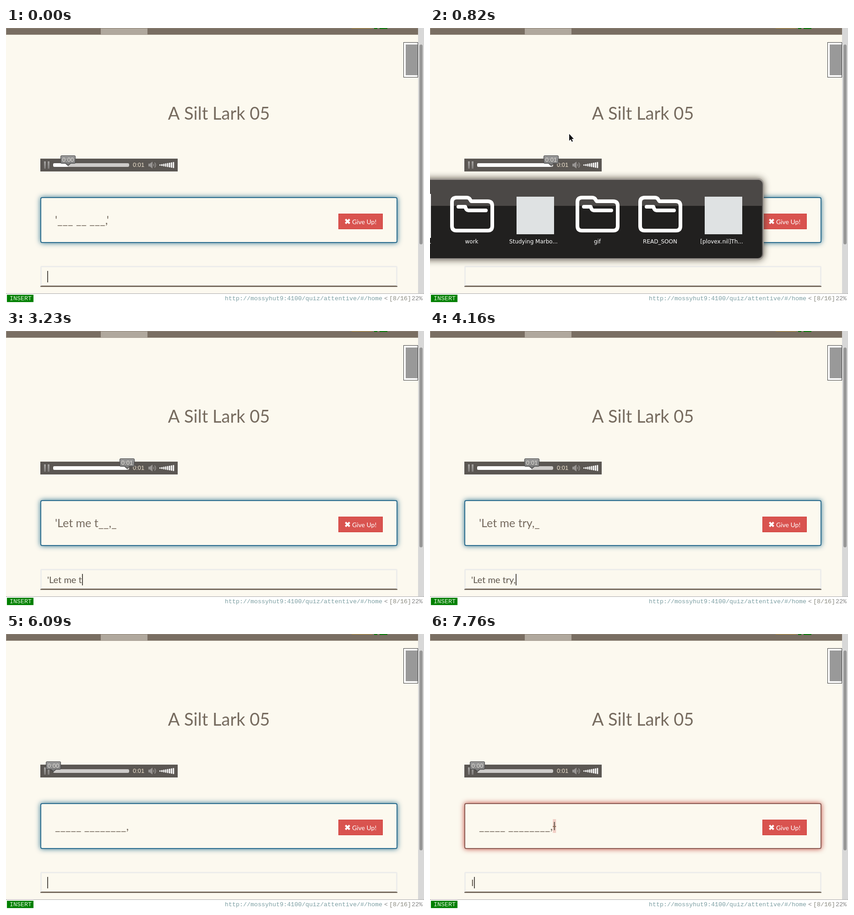
An HTML page with a canvas that plays this animation: 913x600 px, repeating every 7.79 s.

```html
<!DOCTYPE html>
<html lang="en">
<head>
<meta charset="utf-8">
<title>Listening quiz</title>
<style>
  html, body { margin: 0; width: 100%; height: 100%; overflow: hidden; background: #fcf9ef; }
  canvas { display: block; }
</style>
</head>
<body>
<canvas id="stage" width="913" height="600"></canvas>
<script>
const ctx = document.getElementById('stage').getContext('2d');
const LOOP = 7790;
const PAPER = '#fcf9ef', BROWN = '#766b5f';
const LATO = 'Lato, sans-serif';
const ARIAL = '"Liberation Sans", Arial, sans-serif';
const MONO = '"Liberation Mono", monospace';
const PHRASE = "'Let me try,'";
const BLANKS = '_____ ________,';

// [start time, left edge of the time bubble]
const tipTrack = [
  [0, 119], [230, 162], [520, 206], [780, 248], [900, 87],
  [1210, 119], [1500, 162], [1720, 206], [2010, 248], [2180, 87],
  [2390, 119], [2670, 162], [2950, 206], [3230, 248], [3380, 87],
  [3580, 119], [3860, 162], [4110, 206], [4410, 249], [4540, 87],
  [4770, 113], [5030, 156], [5310, 87],
  [6170, 89], [6440, 121], [6690, 149], [6940, 182], [7240, 214], [7500, 247], [7760, 87]
];
// moment at which each character of the phrase is typed
const keyTimes = [1430, 1850, 2060, 2120, 2340, 2670, 2800, 2990, 3180, 3330, 3580, 4060, 4190];
const SOLVED = 4190, NEXT = 5310, PLAY = 6090, WRONG_KEY = 7560, WRONG = 7720;

const within = (t, a, b) => t >= a && t < b;

function valueAt(track, t) {
  let v = track[0][1];
  for (const [start, x] of track) if (t >= start) v = x;
  return v;
}

function rect(x, y, w, h, color) {
  ctx.fillStyle = color;
  ctx.fillRect(x, y, w, h);
}

function pill(x, y, w, h, r, color) {
  ctx.fillStyle = color;
  ctx.beginPath();
  ctx.roundRect(x, y, w, h, r);
  ctx.fill();
}

function text(str, x, y, font, color, align = 'left') {
  ctx.font = font;
  ctx.fillStyle = color;
  ctx.textAlign = align;
  ctx.fillText(str, x, y);
  return ctx.measureText(str).width;
}

function line(d, width, color, cap = 'butt') {
  ctx.lineWidth = width;
  ctx.strokeStyle = color;
  ctx.lineCap = cap;
  ctx.lineJoin = cap === 'round' ? 'round' : 'miter';
  ctx.stroke(new Path2D(d));
}

function drawPage() {
  rect(0, 0, 913, 600, PAPER);
  rect(0, 0, 900, 14, '#796e62');
  rect(207, 0, 102, 14, '#b0a89d');
  rect(0, 14, 900, 1, '#a79e92');
  rect(0, 0, 900, 1, '#91867a');
  rect(755, 0, 45, 1, '#c09a45');
  rect(804, 0, 7, 2, '#087a08');
  rect(816, 0, 17, 2, '#087a08');
  rect(0, 0, 1, 14, '#a79e92');

  rect(900, 0, 13, 579, '#d8d8d8');
  pill(903, 36, 7, 436, 3.5, '#989898');

  rect(868, 31, 32, 77, '#3f3f3f');
  rect(869, 32, 30, 75, '#ffffff');
  rect(873, 36, 26, 67, '#999999');

  text('A Silt Lark 05', 465, 199.5, '38px ' + LATO, BROWN, 'center');
}

function drawStatus() {
  rect(0, 579, 913, 21, '#ffffff');
  for (let x = 0; x < 913; x += 2) rect(x, 579, 1, 1, '#555555');
  rect(2, 582, 58, 16, '#008000');
  const font = '13.33px ' + MONO;
  text('INSERT', 8, 594, font, '#e4f3e0');
  text('http://mossyhut9:4100/quiz/attentive/#/home', 478, 594, font, '#7d9fa3');
  text('<', 826, 594, font, '#858585');
  text('[8/16]', 837, 594, font, '#8b8b80');
  text('22%', 886, 594, font, '#858585');
}

function drawTip(left) {
  const mid = left + 16.5;
  ctx.fillStyle = '#3c3c3c';
  ctx.beginPath();
  ctx.moveTo(mid - 7, 295);
  ctx.lineTo(mid + 7, 295);
  ctx.lineTo(mid, 301);
  ctx.fill();
  const g = ctx.createLinearGradient(0, 278, 0, 299);
  g.addColorStop(0, '#9c9c9c');
  g.addColorStop(1, '#767676');
  pill(left, 278, 33, 18, 3, '#444444');
  pill(left + 1, 279, 31, 16, 2, g);
  ctx.beginPath();
  ctx.moveTo(mid - 5, 295);
  ctx.lineTo(mid + 5, 295);
  ctx.lineTo(mid, 299.5);
  ctx.fill();
  text(left > 190 ? '0:01' : '0:00', mid, 292, '13px ' + ARIAL, '#e2dfd9', 'center');
}

function drawPlayer(t) {
  const left = valueAt(tipTrack, t);
  const idle = within(t, NEXT, PLAY);
  rect(75, 285, 300, 28, '#5b5753');

  const g = ctx.createLinearGradient(0, 291, 0, 307);
  g.addColorStop(0, '#a6a4a2');
  g.addColorStop(1, '#7d7a78');
  if (idle) {
    ctx.fillStyle = g;
    ctx.fill(new Path2D('M83 291 L96 299 L83 307 Z'));
  } else {
    rect(83, 291, 4, 16, g);
    rect(91, 291, 4, 16, g);
  }

  pill(103, 295, 166, 8, 3, '#cdcbc9');
  const done = Math.min(left + 16.5, 269) - 103;
  if (done > 1) pill(103, 295, done, 8, 3, '#ffffff');
  text(idle ? '0:00' : '0:01', 277, 303, '13px ' + ARIAL, '#efe3cf');

  ctx.fillStyle = '#979492';
  ctx.fill(new Path2D('M311 296 H314 L320 291.5 V306.5 L314 302 H311 Z'));
  line('M322 296.5 Q324.5 299 322 301.5 M324.5 293.5 Q329.5 299 324.5 304.5', 1.6, '#979492');
  for (let i = 0; i < 8; i++) {
    const h = 2.5 + i * 1.5;
    rect(335 + i * 4.2, 299 - h / 2, 2.8, h, '#ffffff');
  }
  drawTip(left);
}

function drawAnswer(t) {
  const font = '25px ' + LATO, y = 428;
  if (t >= NEXT) {
    const w = text(BLANKS, 107, y, font, BROWN);
    if (t >= WRONG) {
      const x = 107 + w;
      ctx.font = font;
      const iw = ctx.measureText('I').width;
      rect(x, 404, iw, 30, '#f1cfc6');
      text('I', x, y, font, BROWN);
      rect(x, 419, iw, 2, '#8d6d57');
    }
    return;
  }
  const n = keyTimes.filter(k => t >= k).length;
  if (t >= SOLVED) {
    line('M110 418.5 L117 425.5 L130 410.5', 6, '#005a00');
    text(PHRASE, 145, y, font, BROWN);
  } else {
    const hidden = n ? /[^ ,]/g : /[a-z]/gi;
    text(PHRASE.slice(0, n) + PHRASE.slice(n).replace(hidden, '_'), 107, y, font, BROWN);
  }
}

function drawCard(t) {
  let border = '#2b6d8f', glow = '#2f7390', blur = 12;
  if (within(t, SOLVED, NEXT)) {
    const full = t >= 4260;
    border = full ? '#005a0a' : '#16644e';
    glow = full ? '#2f7d2f' : '#2f785f';
  } else if (t >= WRONG) {
    const late = t >= 7760;
    border = late ? '#8c5d55' : '#5c6671';
    glow = late ? '#c0463a' : '#846068';
  }
  ctx.save();
  ctx.shadowColor = glow;
  ctx.shadowBlur = blur;
  pill(75, 369, 780, 100, 4, border);
  ctx.restore();
  pill(77, 371, 776, 96, 2.5, PAPER);
  drawAnswer(t);

  if (!within(t, SOLVED, NEXT)) {
    rect(726, 405, 97, 34, '#d13f3a');
    rect(727, 406, 95, 32, '#d9534f');
    line('M741.5 417.5 L750.5 426.5 M750.5 417.5 L741.5 426.5', 4, '#ffffff');
    text('Give Up!', 756, 427.5, '14px ' + LATO, '#ffffff');
  }
}

function drawInput(t) {
  pill(75, 519, 780, 46, 3, '#ededeb');
  rect(78, 522, 774, 40, PAPER);
  ctx.fillStyle = BROWN;
  ctx.fill(new Path2D('M78 562 H852 L855 565 H75 Z'));
  pill(75, 562.5, 780, 2.5, 1.2, BROWN);

  let typed = '';
  if (t < NEXT) typed = PHRASE.slice(0, keyTimes.filter(k => t >= k).length);
  else if (t >= WRONG_KEY) typed = 'I';
  const w = text(typed, 90, 549.5, '20px ' + LATO, '#5f574e');
  const caret = t < 280 || within(t, 1370, 6380) || t >= WRONG_KEY;
  if (caret) rect(Math.round(90 + w), 530, 2, 25, '#54504a');
}

function drawFolder(x) {
  ctx.save();
  ctx.translate(x, 366);
  line('M4 14 Q4 4 14 4 H36 Q42 4 44 9 L46 12 H82 Q92 12 92 22 V66 Q92 76 82 76 H14 Q4 76 4 66 Z', 8, '#ffffff', 'round');
  line('M18 24 H33 Q35 32 40 32 H78', 8, '#ffffff', 'round');
  ctx.restore();
}

function drawDock() {
  ctx.save();
  ctx.shadowColor = 'rgba(60,52,40,0.8)';
  ctx.shadowBlur = 15;
  pill(-30, 328, 759, 178, 12, '#a39e98');
  ctx.restore();
  pill(-30, 331, 757, 172, 10, '#5e5a57');
  pill(-30, 332, 755, 170, 9, '#21201f');
  pill(-30, 332, 755, 56, [9, 9, 0, 0], '#4b4846');

  rect(0, 362, 2, 96, '#ffffff');
  [44, 318, 455].forEach(drawFolder);
  for (const x of [189, 600]) rect(x, 368, 82, 82, '#dfe2e3');

  const names = [['work', 91], ['Studying Marbo...', 226], ['gif', 365.5],
    ['READ_SOON', 502.5], ['[plovex.nil]Th...', 637]];
  for (const [name, x] of names) {
    text(name, x, 470, '12px "DejaVu Sans", sans-serif', '#ffffff', 'center');
  }
  rect(0, 469, 1.5, 1.5, '#ffffff');
}

function drawPointer() {
  const arrow = 'M304 231 V246 L307.3 243 L309.8 248.3 L312 247.3 L309.6 242 H314 Z';
  line(arrow, 2, '#ffffff');
  ctx.fillStyle = '#111111';
  ctx.fill(new Path2D(arrow));
}

function draw(t) {
  drawPage();
  drawPlayer(t);
  drawCard(t);
  drawInput(t);
  if (within(t, 600, 850)) drawDock();
  if (within(t, 690, 1370)) drawPointer();
  drawStatus();
}

const begin = performance.now();
function tick() {
  draw((performance.now() - begin) % LOOP);
  requestAnimationFrame(tick);
}
tick();
</script>
</body>
</html>
```
